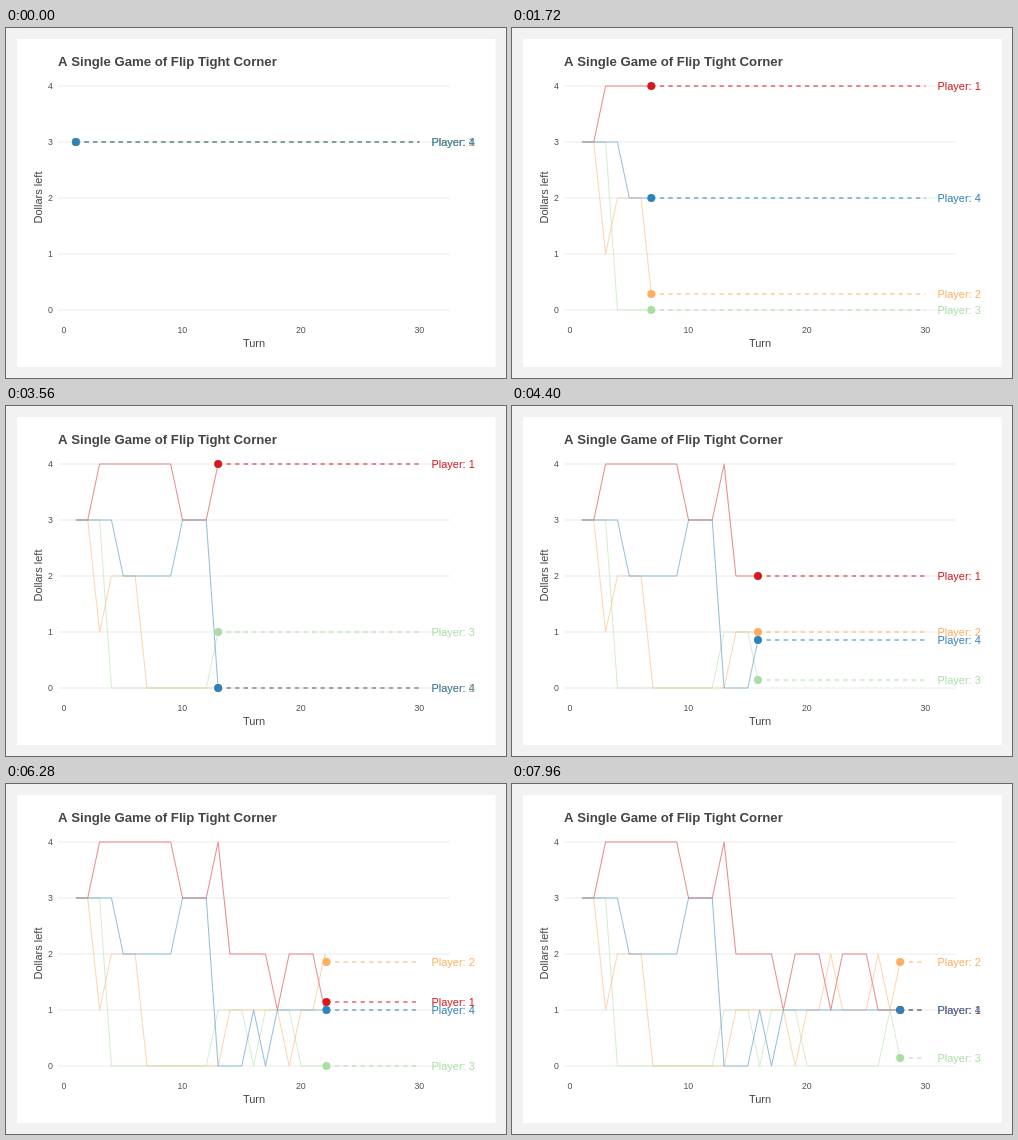
Write an HTML page with a canvas that moves like this. It is 500 px wide and 350 px high and loops after 8 s.

```html
<!DOCTYPE html>
<html lang="en">
<head>
<meta charset="utf-8">
<title>A Single Game of Flip Tight Corner</title>
<style>
  html, body { margin: 0; width: 100%; height: 100%; overflow: hidden; background: #f2f2f2; }
  canvas { display: block; }
</style>
</head>
<body>
<canvas id="chart" width="500" height="350"></canvas>
<script>
const ctx = document.getElementById('chart').getContext('2d');
const FONT = '"Liberation Sans", Arial, sans-serif';
const FRAME_MS = 40, FRAMES = 200, LAST_TURN = 30;
const FRAMES_PER_TURN = 215 / 29;
const LINE_WIDTH = 1.067;

// One digit per turn, starting at turn 1: dollars each player holds.
const players = [
  { name: 'Player: 1', color: '#d7191c', dollars: '3344444443334222212221222111' },
  { name: 'Player: 2', color: '#fdae61', dollars: '3312220000000111110112111212' },
  { name: 'Player: 3', color: '#abdda4', dollars: '3330000000001110111000000010' },
  { name: 'Player: 4', color: '#2b83ba', dollars: '3333222223330001011111111111' }
].map(p => ({ ...p, dollars: [...p.dollars].map(Number) }));

const xOf = turn => 58.05 + 11.85 * turn;
const yOf = dollars => 282 - 56 * dollars;
const frameOfTurn = turn => Math.round((turn - 1) * FRAMES_PER_TURN);

function text(str, x, y, size, color, align = 'left', weight = 'normal') {
  ctx.font = `${weight} ${size}px ${FONT}`;
  ctx.fillStyle = color;
  ctx.textAlign = align;
  ctx.fillText(str, x, y);
}

function polyline(points, color, alpha = 1, dash = []) {
  ctx.save();
  ctx.globalAlpha = alpha;
  ctx.strokeStyle = color;
  ctx.lineWidth = LINE_WIDTH;
  ctx.lineJoin = 'round';
  ctx.setLineDash(dash);
  ctx.beginPath();
  points.forEach(([x, y]) => ctx.lineTo(x, y));
  ctx.stroke();
  ctx.restore();
}

function drawAxes() {
  ctx.fillStyle = '#f2f2f2';
  ctx.fillRect(0, 0, 500, 350);
  ctx.fillStyle = '#fff';
  ctx.fillRect(11, 11, 478.5, 328);

  for (let d = 0; d <= 4; d++) {
    polyline([[52, yOf(d)], [443.7, yOf(d)]], '#ebebeb');
    text(d, 47, yOf(d) + 3.2, 8.8, '#4d4d4d', 'right');
  }
  for (let t = 0; t <= 30; t += 10) text(t, xOf(t) - 0.2, 305, 8.8, '#4d4d4d', 'center');

  text('A Single Game of Flip Tight Corner', 52, 38, 13.2, '#444', 'left', 'bold');
  text('Turn', 248, 319, 11, '#444', 'center');
  ctx.save();
  ctx.translate(36, 169.5);
  ctx.rotate(-Math.PI / 2);
  text('Dollars left', 0, 0, 11, '#444', 'center');
  ctx.restore();
}

function drawPlayers(frame) {
  let turn = 1;
  while (frameOfTurn(turn + 1) <= frame) turn++;
  const start = frameOfTurn(turn);
  const part = (frame - start) / (frameOfTurn(turn + 1) - start);
  const x = xOf(turn + part);

  const current = players.map(({ dollars, ...p }) => {
    const from = dollars[turn - 1], to = dollars[turn];
    const y = yOf(from + (to - from) * part);
    const past = dollars.slice(0, turn).map((d, i) => [xOf(i + 1), yOf(d)]);
    return { ...p, y, path: [...past, [x, y]] };
  });

  const dash = 4 * LINE_WIDTH;
  for (const p of current) polyline(p.path, p.color, 0.5);
  for (const p of current) polyline([[x, p.y], [xOf(LAST_TURN), p.y]], p.color, 1, [dash, dash]);
  for (const p of current) {
    ctx.fillStyle = p.color;
    ctx.beginPath();
    ctx.arc(x, p.y, 4, 0, 2 * Math.PI);
    ctx.fill();
  }
  for (const p of current) text(p.name, xOf(LAST_TURN + 1), p.y + 4, 11, p.color);
}

function render() {
  drawAxes();
  drawPlayers(Math.floor(performance.now() / FRAME_MS) % FRAMES);
  requestAnimationFrame(render);
}
render();
</script>
</body>
</html>
```
